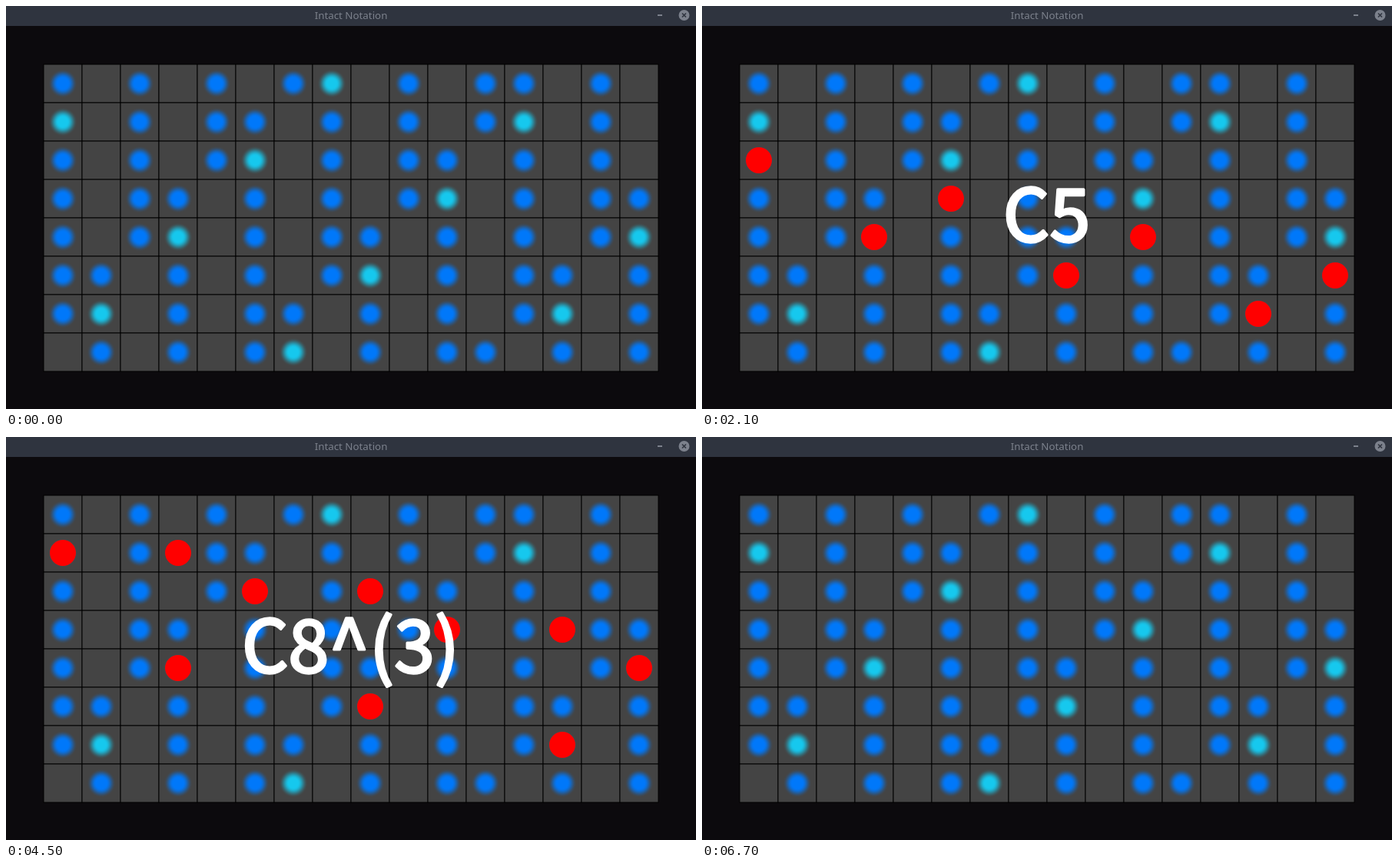
Animation of 898x525 px, one loop 8300 ms. Source, as an HTML page:

```html
<!DOCTYPE html>
<html lang="en">
<head>
<meta charset="utf-8">
<title>Intact Notation</title>
<style>
  html, body { margin: 0; width: 100%; height: 100%; overflow: hidden; background: #0c0a0d; }
  svg { display: block; width: 898px; height: 525px; }
  .title { font: 13.33px "Noto Sans", sans-serif; fill: #7c818c; text-anchor: middle; }
  .chord { opacity: 0; }
  .chord text {
    font: 500 95px "Noto Sans CJK JP", "Noto Sans CJK SC", "Noto Sans CJK", "Noto Sans", sans-serif;
    font-kerning: none;
    fill: #fff; stroke: #fff; stroke-width: 3.4; stroke-linejoin: round;
    text-anchor: middle;
  }
</style>
</head>
<body>
<svg id="stage" viewBox="0 0 898 525">
  <defs></defs>
  <rect width="898" height="525" fill="#0c0a0d"/>
  <rect width="898" height="26" fill="#2f343f"/>
  <text class="title" x="449" y="17">Intact Notation</text>
  <rect x="848" y="11" width="6" height="2" fill="#7c818c"/>
  <circle cx="882.5" cy="12" r="7" fill="#7c818c"/>
  <path d="M880 9.5l5 5m0-5l-5 5" stroke="#2f343f" stroke-width="1.6"/>
</svg>
<script>
  const NS = "http://www.w3.org/2000/svg";
  const LOOP = 8300, COLS = 16, ROWS = 8, STEP = 50, LEFT = 49, TOP = 76;
  const SCALE = [0, 2, 4, 5, 7, 9, 11];

  // Label, start, end, and semitones above the root
  const CHORDS = [
    ["C", 800, 1200, [0]],
    ["C5", 2100, 2600, [0, 7]],
    ["C8^3", 3700, 4500, [0, 12, 16]],
    ["C8^(3)", 4500, 5400, [0, 12, 15]],
    ["C^(3)", 6000, 6700, [0, 15]]
  ];

  const stage = document.getElementById("stage");

  function add(parent, tag, attrs) {
    const el = document.createElementNS(NS, tag);
    for (const key in attrs) el.setAttribute(key, attrs[key]);
    return parent.appendChild(el);
  }

  // Solid core with a smooth falloff to the rim
  function glow(id, color, core) {
    const gradient = add(stage.querySelector("defs"), "radialGradient", { id });
    for (let i = 0; i <= 8; i++) {
      const u = i / 8;
      add(gradient, "stop", {
        offset: core + (1 - core) * u,
        "stop-color": color,
        "stop-opacity": 1 - u * u * (3 - 2 * u)
      });
    }
  }

  // Semitones rise to the right, fourths rise upwards
  const pitch = (col, row) => col - 3 + 5 * (4 - row);

  function eachCell(visit) {
    for (let row = 0; row < ROWS; row++)
      for (let col = 0; col < COLS; col++) visit(col, row, pitch(col, row));
  }

  function dot(parent, col, row, r, fill) {
    add(parent, "circle", {
      cx: LEFT + (col + 0.5) * STEP, cy: TOP + (row + 0.5) * STEP, r, fill
    });
  }

  glow("note", "#0078fa", 0.36);
  glow("root", "#16c8ee", 0.32);

  eachCell((col, row, p) => {
    add(stage, "rect", {
      x: LEFT + col * STEP, y: TOP + row * STEP, width: STEP, height: STEP,
      fill: "#444", stroke: "#000", "stroke-width": 1
    });
  });

  eachCell((col, row, p) => {
    const tone = (p + 24) % 12;
    if (SCALE.includes(tone)) dot(stage, col, row, 18.5, tone ? "url(#note)" : "url(#root)");
  });

  for (const [label, start, end, tones] of CHORDS) {
    const group = add(stage, "g", { class: "chord" });
    eachCell((col, row, p) => {
      if (tones.includes(p)) dot(group, col, row, 17, "#f00");
    });
    add(group, "text", { x: 448.5, y: 307 }).textContent = label;

    const a = start / LOOP, b = end / LOOP;
    group.animate([
      { opacity: 0, offset: 0 }, { opacity: 0, offset: a },
      { opacity: 1, offset: a }, { opacity: 1, offset: b },
      { opacity: 0, offset: b }, { opacity: 0, offset: 1 }
    ], { duration: LOOP, iterations: Infinity });
  }
</script>
</body>
</html>
```
